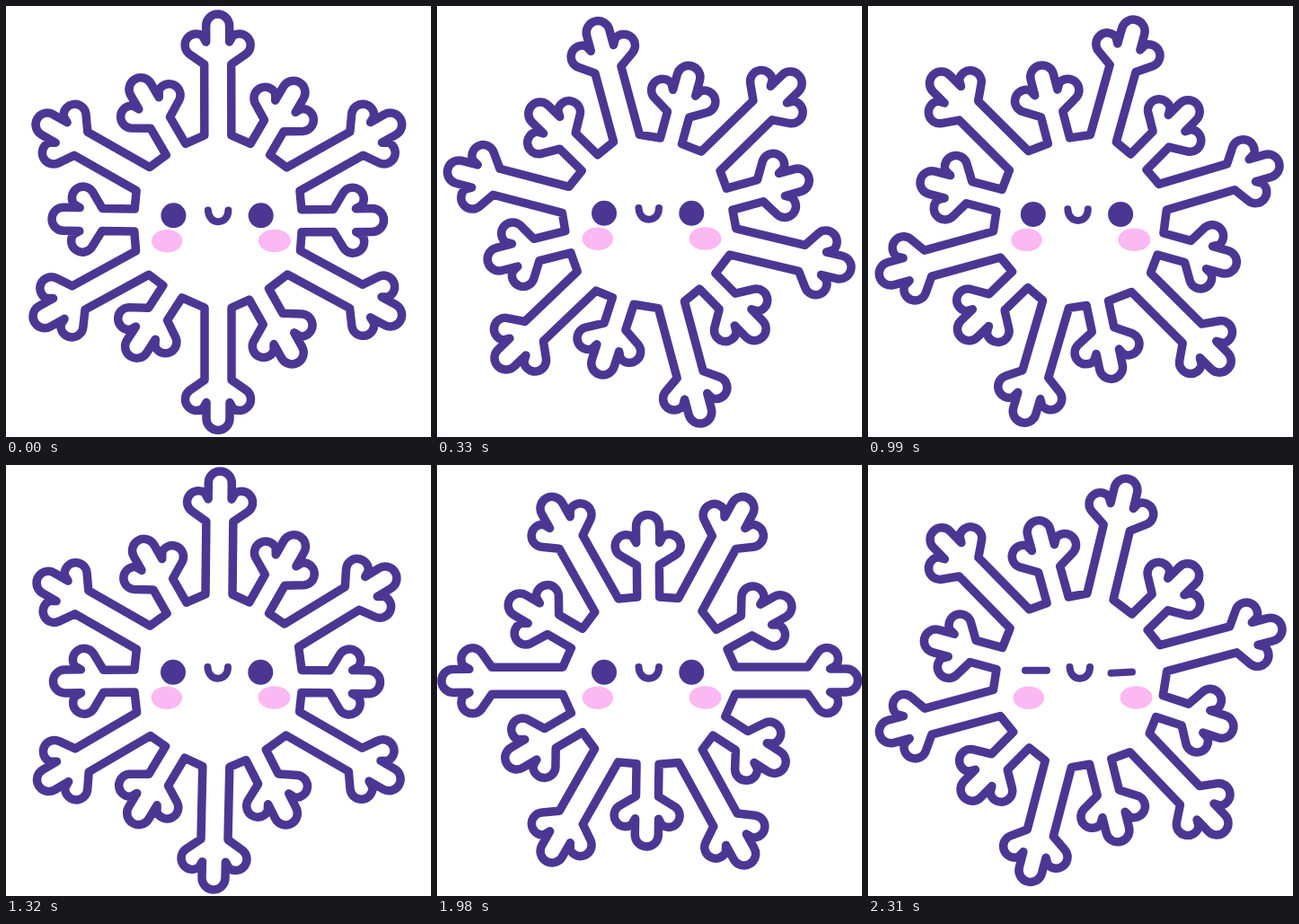
An HTML page with a canvas for the animation above (2.64 s loop, 473 px wide and 480 px high).

```html
<!DOCTYPE html>
<html lang="en">
<head>
<meta charset="utf-8">
<title>Happy snowflake</title>
<style>
html, body { margin: 0; height: 100%; overflow: hidden; background: #fff; }
canvas { display: block; }
</style>
</head>
<body>
<canvas id="stage" width="473" height="480"></canvas>
<script>
const ctx = document.getElementById('stage').getContext('2d');
const PURPLE = '#4b3793', PINK = '#fbb8f2';
const STEP = 330, STEPS = 8, RAD = Math.PI / 180;

// Clockwise from the top, long and short arms alternating: [tilt in degrees, reach]
const ARMS = [
  [-.1, 231], [.3, 179.5], [.6, 233], [-.5, 184.5], [-1.5, 231], [.6, 180.5],
  [0, 232.5], [3, 179], [1.3, 233], [.9, 185], [-.4, 231.5], [-.3, 183.5]
];

// Face drift at each step; it rests where none is given
const DRIFT = [[.4, 2.5], [0, 0], [.2, -2.6], [-2.2, 1.2]];

// Outline of one arm pointing up from the centre
function arm(reach, long) {
  const w = long ? 15 : 12.5, base = long ? -96 : -93;
  const at = y => y - reach;
  ctx.lineTo(-w, base);
  ctx.lineTo(-w, at(56));
  ctx.arc(-24, at(34.5), 12.5, 2.18, 5.32);
  ctx.lineTo(-13, at(31));
  ctx.arc(0, at(13), 13, Math.PI, 2 * Math.PI);
  ctx.lineTo(13, at(31));
  ctx.arc(24, at(34.5), 12.5, Math.PI - 5.32, Math.PI - 2.18);
  ctx.lineTo(w, at(56));
  ctx.lineTo(w, base);
}

function flake(turn) {
  ctx.beginPath();
  ARMS.forEach(([tilt, reach], i) => {
    ctx.save();
    ctx.translate(236, 240);
    ctx.rotate((turn + i * 30 + tilt) * RAD);
    arm(reach, i % 2 === 0);
    ctx.restore();
  });
  ctx.closePath();
  ctx.fillStyle = '#fff';
  ctx.fill();
  ctx.lineWidth = 9.5;
  ctx.stroke();
}

function oval(x, y, rx, ry, color) {
  ctx.beginPath();
  ctx.ellipse(x, y, rx, ry, 0, 0, 2 * Math.PI);
  ctx.fillStyle = color;
  ctx.fill();
}

function face([dx, dy], blink) {
  ctx.save();
  ctx.translate(dx, dy);
  oval(178.8, 259.2, 17.2, 12.7, PINK);
  oval(298.5, 259, 18, 12.7, PINK);

  ctx.beginPath();
  ctx.moveTo(224.5, 225);
  ctx.bezierCurveTo(225, 242, 247, 242, 247, 225);
  ctx.lineWidth = 8;
  ctx.stroke();

  if (blink) {
    ctx.beginPath();
    ctx.moveTo(175, 228.7);
    ctx.lineTo(199, 228.7);
    ctx.moveTo(270.5, 231.7);
    ctx.lineTo(294, 230.6);
    ctx.stroke();
  } else {
    oval(186, 230.8, 14, 14, PURPLE);
    oval(283.3, 230.8, 14, 14, PURPLE);
  }
  ctx.restore();
}

function draw() {
  const step = Math.floor(performance.now() / STEP) % STEPS;
  ctx.clearRect(0, 0, 473, 480);
  ctx.strokeStyle = PURPLE;
  ctx.lineJoin = ctx.lineCap = 'round';
  flake(-15 * step);
  face(DRIFT[step] || [0, 0], step === STEPS - 1);
  requestAnimationFrame(draw);
}
draw();
</script>
</body>
</html>
```
